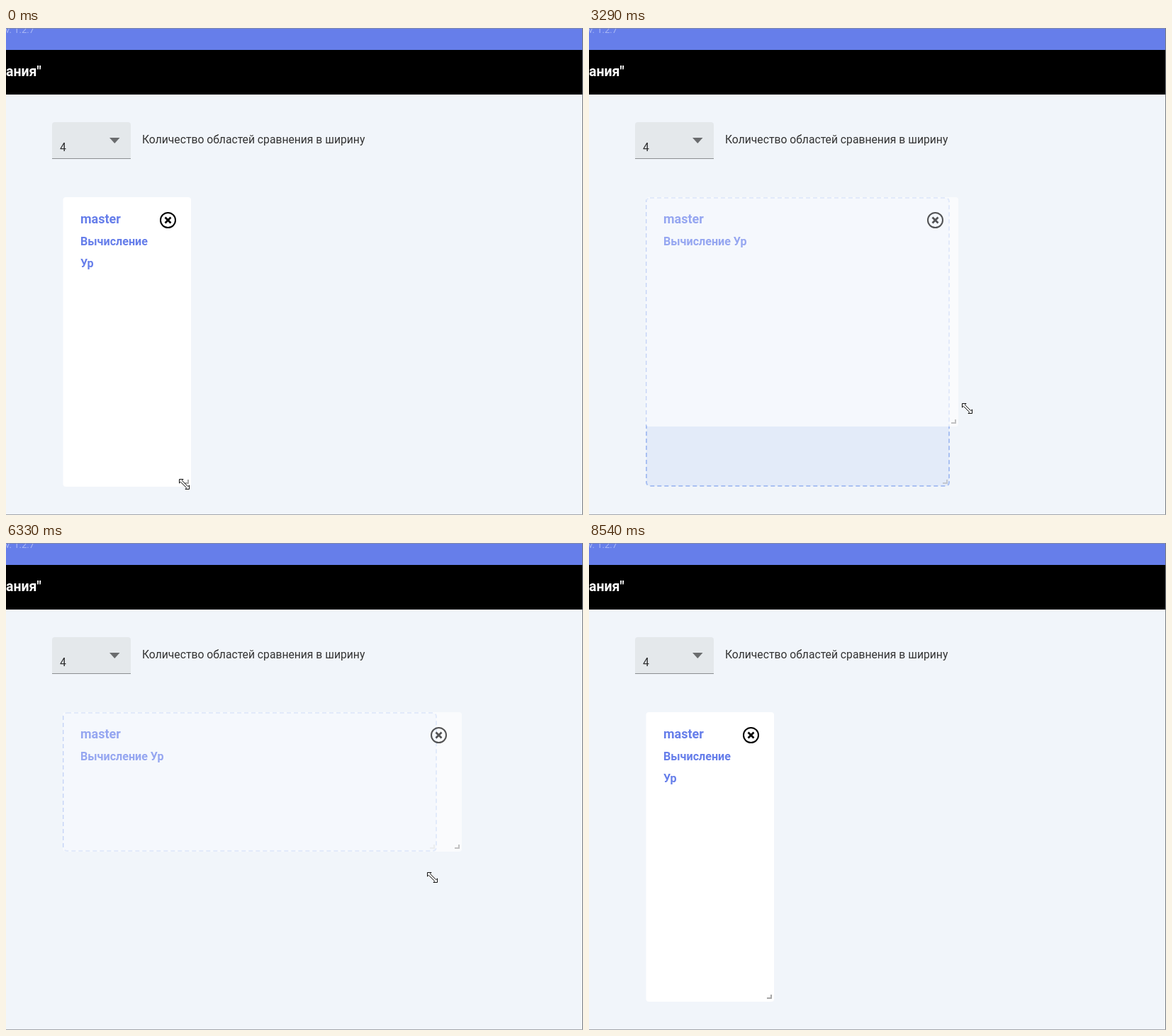
Animation of 814 by 688 pixels, one loop 9360 ms. Source, as an HTML page with a canvas:

```html
<!DOCTYPE html>
<html lang="ru">
<head>
<meta charset="utf-8">
<style>
html, body { margin: 0; width: 100%; height: 100%; overflow: hidden; background: #f1f5fa; }
canvas { display: block; }
</style>
</head>
<body>
<canvas id="stage" width="814" height="688"></canvas>
<script>
const ctx = document.getElementById('stage').getContext('2d');
const LOOP = 9360, REFRESH = 134;
const BLUE = '#667eea', PAGE = '#f1f5fa';
const LEFT = 80, TOP = 239;
const NARROW = { right: 261, bottom: 648 };
const WIDE = { right: 707, bottom: 436 };
const COLUMN = (WIDE.right - NARROW.right) / 9;

// Pointer strokes, each a quadratic curve from the end of the previous one
const strokes = [
  { start: 0, end: 150, via: [251.5, 644.5], to: [283, 676] },
  { start: 1210, end: 1980, via: [254, 651], to: [259.5, 645.5] },
  { start: 2360, end: 4020, via: [578, 509], to: [718, 485] },
  { start: 4020, end: 4320, via: [718, 500], to: [717, 522] },
  { start: 4730, end: 5910, via: [700, 441], to: [702.5, 434.5] },
  { start: 6210, end: 7370, via: [217, 612], to: [255, 648] },
  { start: 7370, end: 8540, via: [330, 655], to: [570, 692] }
];
const drags = [
  { start: 2360, end: 4000, from: NARROW, to: WIDE },
  { start: 6210, end: 7350, from: WIDE, to: NARROW }
];

const within = (t, a, b) => t >= a && t < b;
const clamp = (v, lo, hi) => Math.min(hi, Math.max(lo, v));
const mix = (a, b, p) => a + (b - a) * p;
const latest = (list, t) => list.filter(item => item.start <= t).pop();

// The screen refreshes in even steps during each stroke
function refreshTime(t) {
  const { start, end } = latest(strokes, t);
  const count = Math.round((end - start) / REFRESH);
  const step = (end - start) / count;
  return start + step * Math.min(count, Math.floor((t - start) / step + 0.2));
}

function pointerAt(t) {
  const stroke = latest(strokes, t);
  const previous = strokes[strokes.indexOf(stroke) - 1];
  const from = previous ? previous.to : [251.5, 644.5];
  const p = clamp((t - stroke.start) / (stroke.end - stroke.start), 0, 1);
  return from.map((a, i) => mix(mix(a, stroke.via[i], p), mix(stroke.via[i], stroke.to[i], p), p));
}

// The card follows the pointer with a lag and settles after release
function cardAt(t) {
  const drag = latest(drags, t);
  if (!drag) return NARROW;
  const held = Math.min(t, drag.end);
  const [grabX, grabY] = pointerAt(drag.start);
  const right = drag.from.right + pointerAt(held - 50)[0] - grabX;
  const bottom = drag.from.bottom + pointerAt(held - 220)[1] - grabY;
  const settle = clamp((t - drag.end) / 120, 0, 1);
  return {
    right: Math.round(mix(clamp(right, NARROW.right, WIDE.right), drag.to.right, settle)),
    bottom: Math.round(mix(clamp(bottom, WIDE.bottom, NARROW.bottom), drag.to.bottom, settle))
  };
}

function snap({ right, bottom }) {
  const columns = Math.floor((right - NARROW.right) / COLUMN);
  return {
    right: Math.round(NARROW.right + columns * COLUMN),
    bottom: bottom < 520 ? WIDE.bottom : NARROW.bottom
  };
}

function rect(x, y, w, h, color) {
  ctx.fillStyle = color;
  ctx.fillRect(x, y, w, h);
}

function rounded(x, y, w, h, r, color) {
  ctx.beginPath();
  ctx.roundRect(x, y, w, h, r);
  ctx.fillStyle = color;
  ctx.fill();
}

function text(str, x, y, size, weight, color) {
  ctx.font = `${weight} ${size}px Roboto, sans-serif`;
  ctx.fillStyle = color;
  ctx.fillText(str, x, y);
}

function polygon(points, color) {
  ctx.beginPath();
  points.forEach(([x, y]) => ctx.lineTo(x, y));
  ctx.closePath();
  ctx.fillStyle = color;
  ctx.fill();
}

function drawPage() {
  rect(0, 0, 814, 688, PAGE);
  rect(0, 0, 814, 31, BLUE);
  rect(0, 31, 814, 63, '#000');
  text('v. 1.2.7', -1, 7, 13, 400, '#aab8f4');
  text('ания"', 0, 68, 19.5, 700, '#fff');

  rounded(65, 133, 111, 52, [4, 4, 0, 0], '#e4e8eb');
  rect(65, 184, 111, 1, '#8b8e91');
  text('4', 76, 173.5, 15.7, 400, '#2c2d2e');
  polygon([[146, 155], [160.5, 155], [153.25, 163]], '#6a6c6e');
  text('Количество областей сравнения в ширину', 192, 163, 15.7, 400, '#333');
}

function drawFrame() {
  rect(0, 0, 814, 1, '#8089ab');
  rect(813, 0, 1, 688, '#777a80');
  rect(0, 687, 814, 1, '#a3a6ab');
}

function drawHandle({ right, bottom }) {
  rect(right - 5, bottom - 10, 2, 6, '#a6a6a6');
  rect(right - 10, bottom - 6, 5, 2, '#a6a6a6');
}

function drawSlot(slot) {
  rounded(LEFT + 1, TOP + 1, slot.right - LEFT - 2, slot.bottom - TOP - 2, 5, '#e3ebf9');
  ctx.strokeStyle = '#a9c0f2';
  ctx.lineWidth = 2;
  ctx.setLineDash([6, 4]);
  ctx.stroke();
  ctx.setLineDash([]);
  ctx.globalAlpha = 0.5;
  drawHandle(slot);
}

function drawClose(x, y) {
  ctx.strokeStyle = '#000';
  ctx.lineWidth = 2;
  ctx.beginPath();
  ctx.arc(x, y, 10.5, 0, Math.PI * 2);
  ctx.stroke();
  ctx.lineWidth = 2.7;
  ctx.beginPath();
  for (const s of [-1, 1]) {
    ctx.moveTo(x - 4, y - 4 * s);
    ctx.lineTo(x + 4, y + 4 * s);
  }
  ctx.stroke();
}

function drawCard(card, alpha) {
  ctx.globalAlpha = alpha;
  rounded(LEFT + 0.5, TOP, card.right - LEFT - 0.5, card.bottom - TOP, 4, '#fff');
  text('master', 105, 276, 18, 700, BLUE);
  const lines = card.right < 266 ? ['Вычисление', 'Ур'] : ['Вычисление Ур'];
  lines.forEach((line, i) => text(line, 105, 306.5 + i * 31.5, 16.1, 700, BLUE));
  drawClose(card.right - 32.5, 271.5);
  drawHandle(card);
  ctx.globalAlpha = 1;
}

const arrow = [[0, 0], [0, 14], [3.2, 11], [5.6, 16.6], [8, 15.6], [5.6, 10], [10, 10]];
const head = [[-7, -1.5], [-7, -7], [-1.5, -7], [-3.2, -5.2], [5.2, 3.2]];
const resizer = [...head, ...head.map(([x, y]) => [-x, -y])];

function drawPointer(shape, [x, y]) {
  ctx.save();
  ctx.translate(Math.floor(x) + 0.5, Math.floor(y) + 0.5);
  polygon(shape, '#fff');
  ctx.strokeStyle = '#111';
  ctx.lineWidth = 1;
  ctx.stroke();
  ctx.restore();
}

function draw(time) {
  const t = refreshTime(time);
  const dragging = drags.some(d => within(t, d.start, d.end));
  const resizing = t < 150 || within(t, 1980, 4000) || within(t, 5910, 7350);
  const visible = t < 150 || within(t, 1210, 8540);
  const card = cardAt(t);

  drawPage();
  if (dragging) drawSlot(snap(card));
  drawCard(card, dragging ? 0.67 : 1);
  if (visible) drawPointer(resizing ? resizer : arrow, pointerAt(t));
  drawFrame();
}

const start = performance.now();
function tick() {
  draw((performance.now() - start) % LOOP);
  requestAnimationFrame(tick);
}
tick();
</script>
</body>
</html>
```
